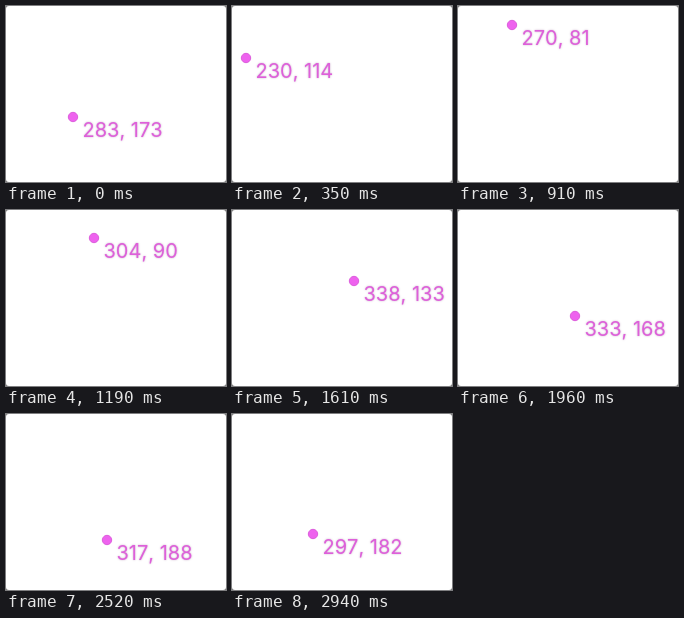
Write an HTML page with a canvas that moves like this. It is 220 px wide and 176 px high and loops after 3010 ms.

```html
<!DOCTYPE html>
<html>
<head>
<meta charset="utf-8">
<style>
  html, body { margin: 0; width: 100%; height: 100%; overflow: hidden; background: #fff; }
  canvas { display: block; }
</style>
</head>
<body>
<canvas id="stage" width="220" height="176"></canvas>
<script>
const ctx = document.getElementById('stage').getContext('2d');
const LOOP = 3010, STEP = 70;
const ORIGIN = { x: 216, y: 62 };

// Key points of the pointer's path
const path = [
  { t: 0, x: 67, y: 111 },
  { t: 350, x: 14, y: 52 },
  { t: 630, x: 26, y: 24 },
  { t: 840, x: 46, y: 19 },
  { t: 1190, x: 88, y: 28 },
  { t: 1610, x: 122, y: 71 },
  { t: 1960, x: 117, y: 106 },
  { t: 2240, x: 113, y: 122 },
  { t: 2520, x: 101, y: 126 },
  { t: 2940, x: 81, y: 120 }
];

function slope(i, axis) {
  const a = path[Math.max(i - 1, 0)];
  const b = path[Math.min(i + 1, path.length - 1)];
  return (b[axis] - a[axis]) / (b.t - a.t);
}

// Smooth cubic curve through the key points
function valueAt(t, axis) {
  let i = 0;
  while (i < path.length - 2 && t >= path[i + 1].t) i++;
  const a = path[i], b = path[i + 1], span = b.t - a.t;
  const u = Math.min((t - a.t) / span, 1), v = 1 - u;
  return v * v * (1 + 2 * u) * a[axis] + u * u * (3 - 2 * u) * b[axis]
    + span * u * v * (v * slope(i, axis) - u * slope(i + 1, axis));
}

function drawWindow() {
  ctx.fillStyle = '#777';
  ctx.fillRect(0, 0, 220, 176);
  ctx.fillStyle = '#fff';
  ctx.beginPath();
  ctx.roundRect(0, 0, 220, 176, 3);
  ctx.fill();
}

function drawDot(x, y) {
  ctx.beginPath();
  ctx.arc(x, y, 4.7, 0, Math.PI * 2);
  ctx.fillStyle = '#ee62ee';
  ctx.fill();
  ctx.strokeStyle = '#dc5ddc';
  ctx.stroke();
}

function drawLabel(text, x, y) {
  ctx.save();
  ctx.font = '20px Inter, "Liberation Sans", sans-serif';
  ctx.fontKerning = 'none';
  ctx.fillStyle = '#de5fda';
  ctx.shadowColor = 'rgba(130, 70, 130, 0.45)';
  ctx.shadowBlur = 2;
  ctx.fillText(text, x, y);
  ctx.restore();
}

function draw(t) {
  const x = Math.round(valueAt(t, 'x')), y = Math.round(valueAt(t, 'y'));
  drawWindow();
  drawDot(x, y);
  drawLabel(`${x + ORIGIN.x}, ${y + ORIGIN.y}`, x + 9.5, y + 20);
}

const start = performance.now();
function tick() {
  const t = (performance.now() - start) % LOOP;
  draw(Math.floor(t / STEP) * STEP);
  requestAnimationFrame(tick);
}
tick();
</script>
</body>
</html>
```
